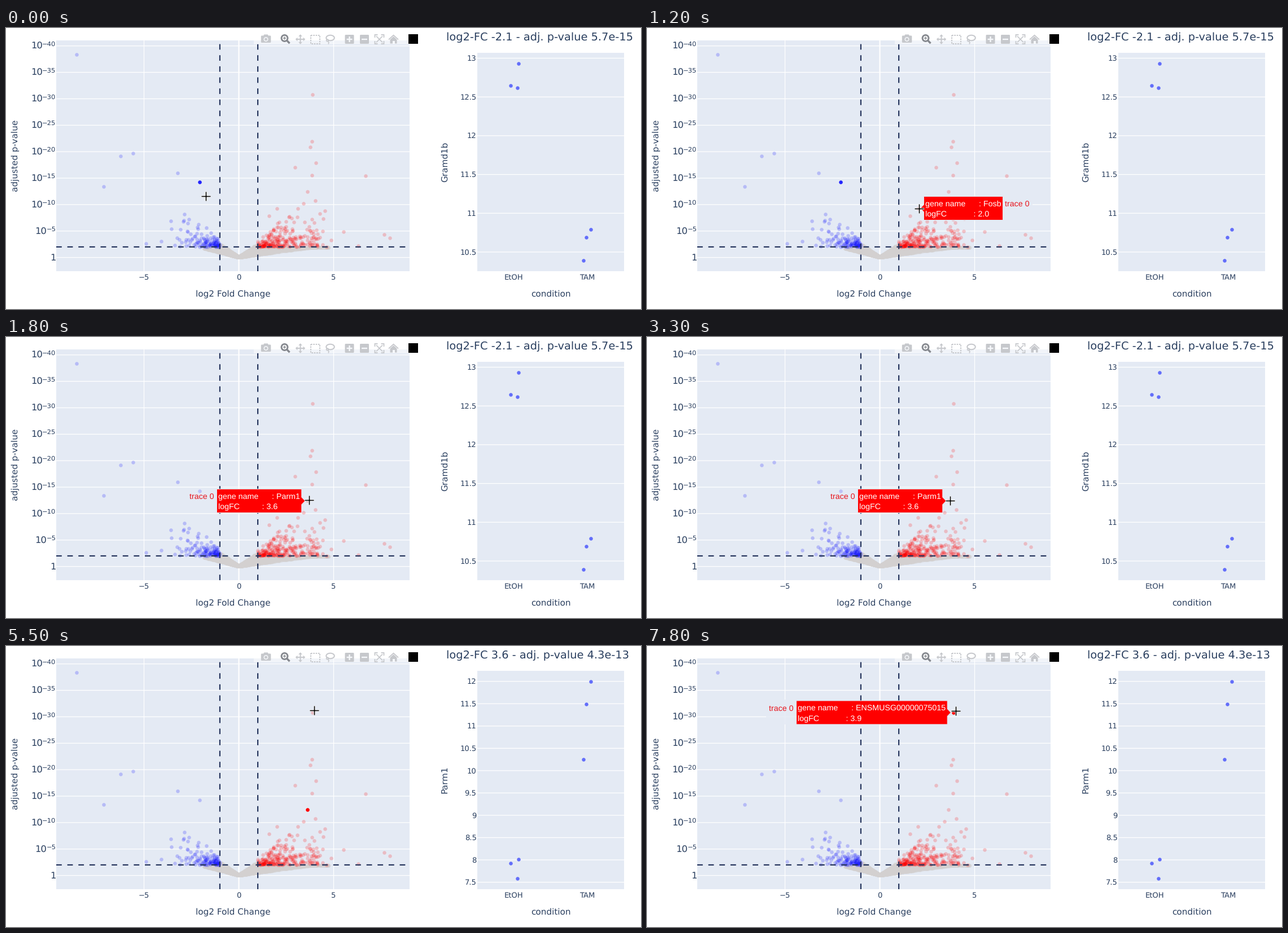
Recreate the animation shown at these times as a matplotlib script. Size 1125 by 498 pixels, loop 8000 ms.

```python
import itertools

import numpy as np
import matplotlib.pyplot as plt
from matplotlib.animation import FuncAnimation
from matplotlib.patches import Circle, Ellipse, FancyBboxPatch, Polygon, Rectangle

W, H, DPI = 1125, 498, 100
PT = 72 / DPI
STEP, FRAMES = 100, 80

PANEL, INK, DASH = "#E4EAF4", "#2a3f5f", "#25345c"
RED, BLUE, GREY, STRIP = "#ff0000", "#0000ff", "#d3d0d0", "#636efa"
ICON, ICON_ON, HOLE = "#c6c8cc", "#85888e", "#f6f8fb"

plt.rcParams.update({"font.family": "DejaVu Sans", "text.hinting": "none"})
fig = plt.figure(figsize=(W / DPI, H / DPI), dpi=DPI, facecolor="white")
ax = fig.add_axes([0, 0, 1, 1])
# Whole coordinates are pixel centres
ax.set_xlim(-0.5, W - 0.5)
ax.set_ylim(H - 0.5, -0.5)
ax.axis("off")


def label(x, y, s, px, color=INK, ha="center", z=3, **kw):
    return ax.text(x - 0.5, y - 0.5, s, fontsize=px * PT, color=color, ha=ha,
                   va="baseline", zorder=z, **kw)


def upright(x, y, s):
    return label(x, y, s, 15.3, rotation=90, rotation_mode="anchor")


def line(xs, ys, color, px, z=1, **kw):
    return ax.plot(xs, ys, color=color, lw=px * PT, zorder=z, snap=False, **kw)[0]


def shape(patch, z=6):
    patch.set_zorder(z)
    return ax.add_patch(patch)


def rect(x0, y0, x1, y1, color, z=0, **kw):
    return shape(Rectangle((x0 - 0.5, y0 - 0.5), x1 - x0, y1 - y0,
                           fc=color, lw=0, **kw), z)


def dots(x, y, color, alpha, z=2):
    return ax.scatter(x, y, s=(6.5 * PT) ** 2, c=color, alpha=alpha,
                      linewidths=0, zorder=z)


def px_x(fc):
    return 412 + 33.6 * fc


def px_y(n):
    return 406.2 - 9.375 * n


def gene_dots(genes, color, alpha, z=2):
    fc, n = np.asarray(genes, float).T
    return dots(px_x(fc), px_y(n), color, alpha, z)


# Volcano panel
rect(89, 22, 715, 431, PANEL)
for fc in (-5, 0, 5):
    x = px_x(fc)
    line([x, x], [22, 430.5], "white", 1.2 if fc else 2.2)
    label(x, 445.5, str(fc).replace("-", "\u2212"), 13.1)
for n in range(0, 45, 5):
    y = px_y(n)
    line([88.5, 714.5], [y, y], "white", 1.3)
    if n == 0:
        label(88.5, y + 6, "1", 16.4, ha="right")
        continue
    power = f"\u2212{n}"
    wide = (0.838 + 0.636 * len(str(n))) * 11.45
    label(88.5, y + 0.5, power, 11.45, ha="right")
    label(89 - wide, y + 6, "10", 16.4, ha="right")
label(402, 476, "log2 Fold Change", 15.3)
upright(20.5, 226.5, "adjusted p-value")

# Genes as (log2 fold change, -log10 p)
rng = np.random.default_rng(12)
PICK_BLUE, PICK_MID, PICK_TOP = (-2.07, 14.3), (3.63, 12.4), (3.88, 30.8)
NEAR, MIDWAY, LOW = (1.6, 7.9), (2.0, 9.3), (3.12, 9.3)
FAR_BLUE = [(-8.56, 38.4), (-6.23, 19.2), (-5.58, 19.7), (-7.12, 13.4),
            (-3.24, 16), (-4.9, 2.6), PICK_BLUE]
FAR_RED = [(3.84, 21.9), (3.77, 20.9), (4.06, 17.9), (2.96, 17), (3.84, 15.5),
           (6.67, 15.4), (7.65, 4.3), (7.96, 3.7), (5.53, 4.9), (6.3, 2.2),
           PICK_MID, PICK_TOP, NEAR, MIDWAY, LOW]


def cloud(count, sign, reach, crowd):
    genes = []
    while len(genes) < count:
        fc = 1 + reach * rng.beta(1, crowd)
        n = 2 + rng.exponential(0.35 + 0.55 * fc)
        if n < min(12, 0.7 + 2.9 * fc):
            genes.append((sign * fc, n))
    return genes


def grey_cloud():
    dx = np.concatenate([rng.normal(0, 24, 4000), rng.exponential(55, 1100)])
    dx = dx[(dx > -62) & (dx < 160)]
    low = 406 - np.where(dx < 0, -0.25, 0.135) * dx
    high = np.where(abs(dx) < 33.6, 405 - 0.7 * abs(dx), 388.5)
    low = np.maximum(low, high)
    y = high + (low - high) * rng.uniform(0, 1, dx.size) ** 0.65
    dots(412 + dx, y, GREY, 0.3)


grey_cloud()
gene_dots(FAR_BLUE + cloud(118, -1, 3.7, 3.2), BLUE, 0.2)
gene_dots(FAR_RED + cloud(245, 1, 4.0, 1.9), RED, 0.2)

dashed = (0, (9.815 / 2.2, 9.815 / 2.2))
for fc in (-1, 1):
    line([px_x(fc)] * 2, [430.5, 22], DASH, 2.2, 4, ls=dashed)
line([88.5, 714.5], [px_y(2)] * 2, DASH, 2.2, 4, ls=dashed)

# Toolbar
MID = 19.5
rect(439, 8, 733, 28.5, "white", 5, alpha=0.5)


def stroke(xs, ys, px=2, color=ICON, z=6):
    return line(xs, ys, color, px, z, solid_capstyle="butt",
                solid_joinstyle="miter")


def plus(x, y, arm, px, color, z=6):
    stroke([x - arm, x + arm], [y, y], px, color, z)
    stroke([x, x], [y - arm, y + arm], px, color, z)


def block(x0, y0, w, h, r=1.5):
    shape(FancyBboxPatch((x0 + r, y0 + r), w - 2 * r, h - 2 * r, fc=ICON, lw=0,
                         boxstyle=f"round,pad={r},rounding_size={r}"))


def ring(cx, cy, w, h, px, color=ICON):
    shape(Ellipse((cx, cy), w, h, fill=False, ec=color, lw=px * PT))


def camera(x):
    block(x - 8.7, 13, 17.5, 12.5)
    block(x - 4, 11, 8, 5)
    shape(Circle((x, MID), 4, fc=HOLE, lw=0), 7)
    shape(Circle((x, MID), 2.5, fc=ICON, lw=0), 8)


def magnifier(x):
    ring(x - 1.5, 17.5, 11, 11, 2.8, ICON_ON)
    stroke([x + 2, x + 7.5], [21, 26.7], 3.4, ICON_ON)
    plus(x - 1.5, 17.5, 2.7, 1.4, ICON_ON)


def pan(x):
    plus(x, MID, 7.5, 2, ICON)
    for ux, uy in ((1, 0), (-1, 0), (0, 1), (0, -1)):
        tip = np.array([x + 8.7 * ux, MID + 8.7 * uy])
        back, side = 3.6 * np.array([ux, uy]), 3.3 * np.array([uy, ux])
        shape(Polygon([tip, tip - back + side, tip - back - side], fc=ICON, lw=0))


def lasso(x):
    ring(x, 17, 14.5, 9.5, 2)
    ring(x - 5, 21.5, 4, 3.5, 1.5)
    stroke([x - 4, x - 2.5, x - 3.5], [23, 25.5, 28], 1.6)


def autoscale(x):
    for sx, sy in itertools.product((-1, 1), repeat=2):
        cx, cy = x + 8 * sx, MID + 8 * sy
        stroke([x, x + 5.5 * sx], [MID, MID + 5.5 * sy], 1.6)
        stroke([cx - 5 * sx, cx, cx], [cy, cy, cy - 5 * sy], 1.8)


def house(x):
    stroke([x - 8.5, x, x + 8.5], [20, 12.3, 20], 1.8)
    shape(Polygon([(x - 6, 20), (x, 14.5), (x + 6, 20), (x + 6, 27), (x - 6, 27)],
                  fc=ICON, lw=0))
    rect(x - 1.5, 22.5, x + 2.5, 27.5, HOLE, 7)


camera(460)
magnifier(494.5)
pan(521)
shape(Rectangle((539.5, 12), 15.5, 15, fill=False, ec=ICON, lw=2 * PT,
                ls=(0, (1.3, 0.85))))
lasso(574)
for x in (608, 634.5):
    block(x - 8, MID - 8, 16, 16)
    stroke([x - 5, x + 5], [MID, MID], 2.4, HOLE, 7)
stroke([608, 608], [MID - 5, MID + 5], 2.4, HOLE, 7)
autoscale(661)
house(686)
rect(713, 11, 730, 28, "black", 6)

# Expression panel
rect(835, 43.5, 1095, 431, PANEL)
for x, s in ((900, "EtOH"), (1030, "TAM")):
    label(x, 445.5, s, 13.1)
label(965, 476, "condition", 15.3)
STRIP_X = [900 + d for d in (7, -6.5, 5)] + [1030 + d for d in (5, -2.5, -8)]


def strip_view(title, gene, top, y_top, gap, count, values):
    parts = [label(780, 22, title, 19.38, ha="left"), upright(782, 237, gene)]
    for k in range(count):
        y = y_top + gap * k
        parts.append(line([834.5, 1094.5], [y, y], "white", 1.3))
        parts.append(label(833.5, y + 5, f"{top - k / 2:g}", 13.1, ha="right"))
    ys = y_top + 2 * gap * (top - np.array(values))
    parts.append(dots(STRIP_X, ys, STRIP, 1))
    return parts


before = strip_view("log2-FC -2.1 - adj. p-value 5.7e-15", "Gramd1b",
                    13, 53, 68.7, 6, (12.93, 12.65, 12.62, 10.79, 10.69, 10.39))
after = strip_view("log2-FC 3.6 - adj. p-value 4.3e-13", "Parm1",
                   12, 62.2, 39.55, 10, (8.02, 7.92, 7.58, 11.99, 11.49, 10.25))


# Hover labels
def hover(spot, gene, gap=12, side=-1):
    fc, n = spot
    x, y = px_x(fc), px_y(n)
    font = dict(color="white", ha="left", z=10, family="Liberation Sans")
    first = label(0, y - 3, "gene name" + " " * 6 + ": " + gene, 14.2, **font)
    second = label(0, y + 15.4, "logFC" + " " * gap + f": {fc:.1f}", 14.2, **font)
    near = x + side * 10.7
    far = near + side * (first.get_window_extent().width + 5.5)
    for text in (first, second):
        text.set_x(min(near, far) + 2.3)
    box = shape(Polygon([(near, y - 21), (far, y - 21), (far, y + 21),
                         (near, y + 21), (near, y + 6.5), (x + side * 4.3, y),
                         (near, y - 6.5)], fc=RED, ec=PANEL, lw=PT), 9)
    back = rect(far, y - 22, far + side * 53, y + 22, PANEL, 8, alpha=0.8)
    name = label(far + side * 4.5, y - 3, "trace 0", 14.2, color="#e8141c", z=10,
                 ha="right" if side < 0 else "left", family="Liberation Sans")
    return [first, second, box, back, name]


def picked(spot, color, alpha):
    return [gene_dots([spot], color, alpha, 3)]


# (start, end, artists shown meanwhile)
TIMED = [
    (800, 1100, hover(NEAR, "Amer2", side=1)),
    (1100, 1300, hover(MIDWAY, "Fosb", side=1)),
    (1300, 1800, hover(LOW, "ENSMUSG00000095891")),
    (1800, 5200, hover(PICK_MID, "Parm1", gap=10)),
    (5700, 8000, hover(PICK_TOP, "ENSMUSG00000075015")),
    (0, 3400, picked(PICK_BLUE, BLUE, 0.8)),
    (3400, 6800, picked(PICK_MID, RED, 1)),
    (6800, 8000, picked(PICK_TOP, RED, 1)),
    (0, 4300, before),
    (4300, 8000, after)]

# Crosshair: (start, end, x, y) of each eased move
MOVES = [(500, 700, 447.5, 311), (700, 1200, 482, 320), (1200, 1600, 537, 289),
         (3200, 3300, 537, 290), (4700, 5000, 616, 174), (5100, 5500, 546, 114),
         (6900, 7000, 547, 115)]
arms = [line([], [], c, w, z, solid_capstyle="butt")
        for c, w, z in (("white", 3.4, 12), ("black", 1.6, 13))]
ARM_X = np.array([-8, 8, np.nan, 0, 0])
ARM_Y = np.array([0, 0, np.nan, -8, 8])


def pointer(t):
    pos = np.array([354.0, 298.0])
    for start, end, x, y in MOVES:
        u = np.clip((t - start) / (end - start), 0, 1)
        pos += (np.array([x, y]) - pos) * (1 - (1 - u) ** 2)
    return pos


def update(i):
    t = i * STEP
    for start, end, parts in TIMED:
        for part in parts:
            part.set_visible(start <= t < end)
    x, y = pointer(t)
    for arm, grow in zip(arms, (1.07, 1)):
        arm.set_data(x + grow * ARM_X, y + grow * ARM_Y)
    return arms


anim = FuncAnimation(fig, update, frames=FRAMES, interval=STEP,
                     init_func=lambda: update(0), repeat=True, repeat_delay=0)
plt.show()
```
